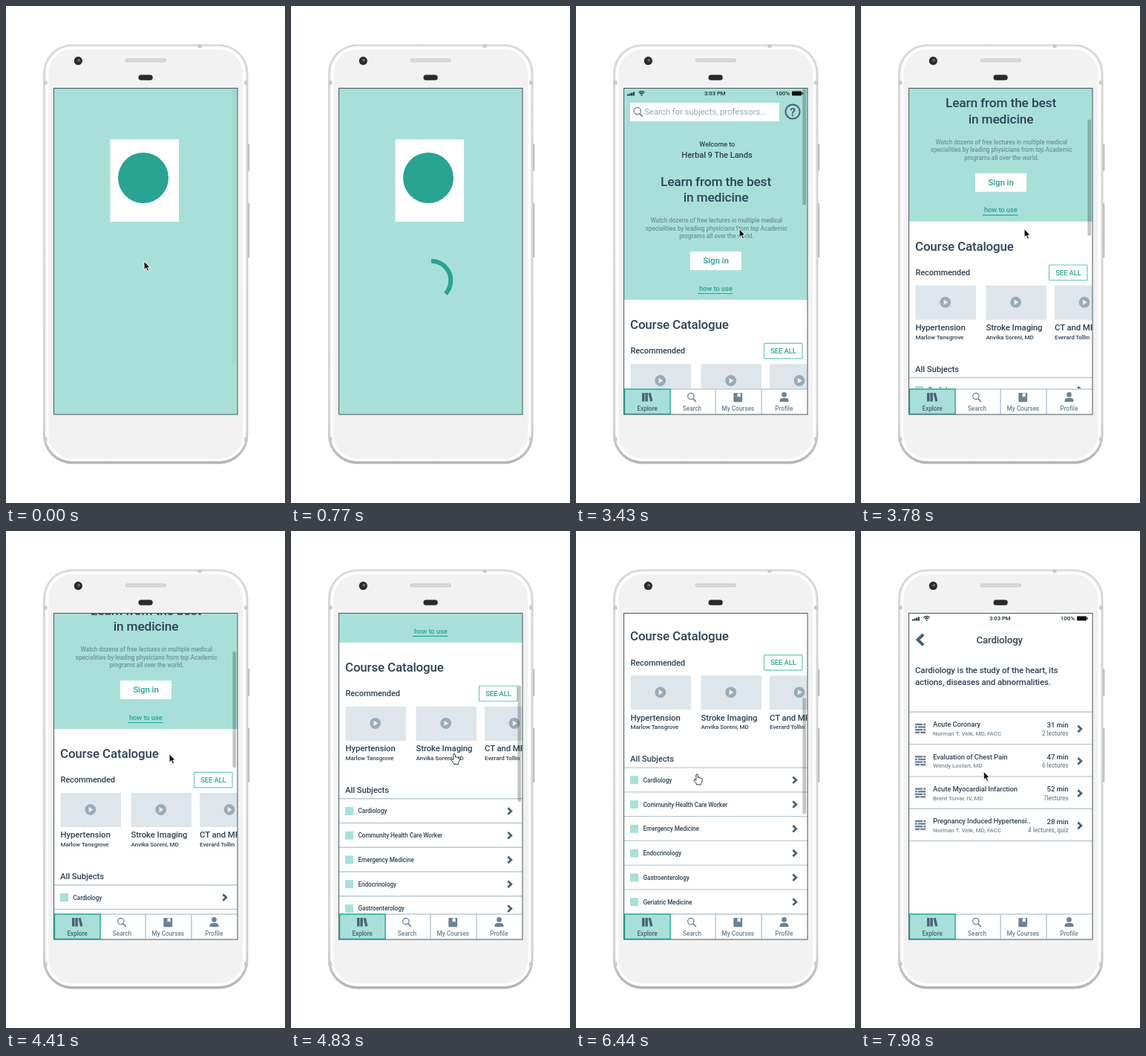
An HTML page for the animation above (8000 ms loop, 376 by 668 pixels).

```html
<!DOCTYPE html>
<html lang="en">
<head>
<meta charset="utf-8">
<title>Course app walkthrough</title>
<style>
html, body { margin: 0; width: 100%; height: 100%; overflow: hidden; background: #fff; }
svg { display: block; }
text { font-family: Roboto, "Open Sans", sans-serif; white-space: pre; letter-spacing: -.008em; }
</style>
</head>
<body>
<svg id="stage" width="376" height="668" viewBox="0 0 376 668"></svg>
<script>
const LOOP = 8000, STEP = 70;
const MINT = '#a8e0d9', TEAL = '#29a392', INK = '#2f4254', SLATE = '#4a6172', GREY = '#7a8c9a', LINE = '#bccad3';

const rect = (x, y, w, h, fill, extra = '') =>
  `<rect x="${x}" y="${y}" width="${w}" height="${h}" fill="${fill}" ${extra}/>`;
const circle = (x, y, r, fill, extra = '') =>
  `<circle cx="${x}" cy="${y}" r="${r}" fill="${fill}" ${extra}/>`;
const stroke = (d, color, width, extra = '') =>
  `<path d="${d}" fill="none" stroke="${color}" stroke-width="${width}" ${extra}/>`;
const shape = (d, fill, extra = '') => `<path d="${d}" fill="${fill}" ${extra}/>`;
const text = (x, y, size, str, fill = INK, anchor = 'start', weight = 500) =>
  `<text x="${x}" y="${y}" font-size="${size}" fill="${fill}" text-anchor="${anchor}" font-weight="${weight}">${str}</text>`;
const group = (id, body) => `<g id="${id}">${body}</g>`;
const chevron = y => stroke(`M292.3 ${y - 4.3}l4.5 4.3l-4.5 4.3`, SLATE, 2.8);
const divider = y => stroke(`M65 ${y}H312`, LINE, 1.4);

function phone() {
  const bands = [[50.5, 103], [321, 103], [50.5, 582], [321, 582]]
    .map(([x, y]) => rect(x, y - 2.5, 5, 5, '#cacaca')).join('');
  return `<defs>
    <linearGradient id="rim" x2="0" y2="1"><stop stop-color="#d6d6d6"/><stop offset=".9" stop-color="#d3d3d3"/><stop offset="1" stop-color="#b4b4b4"/></linearGradient>
    <clipPath id="screen">${rect(65, 111, 247, 438, '#000')}</clipPath></defs>`
    + rect(325, 185, 3.2, 37, '#b9b9b9', 'rx="1"') + rect(325, 265, 3.2, 73, '#b9b9b9', 'rx="1"')
    + rect(50, 51.5, 276.5, 564, 'url(#rim)', 'rx="39"')
    + rect(52.5, 53.5, 271.5, 558.5, '#ececec', 'rx="37"')
    + rect(55.5, 56.5, 265.5, 553.5, '#f2f2f2', 'rx="34" stroke="#fff" stroke-width="3.5"')
    + bands + rect(258.5, 52, 5, 4, '#c6c6c6')
    + rect(161, 71, 54.5, 4, '#dadada', 'rx="2" stroke="#c3c3c3" stroke-width=".8"')
    + circle(97.3, 73.7, 5.6, '#2b2b2b') + circle(97.8, 73.2, 2, '#555') + circle(98.6, 72.4, .8, '#aaa')
    + rect(178.5, 92.4, 19.2, 7.4, '#2a2a2a', 'rx="3.6"');
}

function statusBar() {
  const bars = [0, 1, 2, 3].map(i => rect(69 + i * 2.6, 118.6 - i, 2, 2 + i, '#1d2b2e')).join('');
  const wifi = stroke('M84.3 116.4a5.8 5.8 0 0 1 8.2 0M86 118.2a3.4 3.4 0 0 1 4.8 0', '#1d2b2e', 1.3) + circle(88.4, 119.8, 1, '#1d2b2e');
  return bars + wifi + text(187.3, 120.4, 7.8, '3:03 PM', '#1d2b2e', 'middle')
    + text(288, 120.4, 8, '100%', '#1d2b2e', 'end')
    + rect(291, 114.5, 13, 6, '#111', 'rx="1"') + rect(304.6, 116, 1.2, 3, '#111');
}

function splash() {
  return rect(65, 110, 247, 439, MINT) + rect(140.5, 179.3, 92.5, 110.7, '#fff') + circle(185, 231, 34, TEAL)
    + stroke('M189 342.7a26.3 26.3 0 0 1 0 52.6a26.3 26.3 0 0 1 0-52.6', TEAL, 6, 'id="ring" pathLength="100"');
}

function card(x, center, title, teacher) {
  return rect(x, 481, 81.5, 46, '#dee6ec') + circle(center, 503.5, 7.4, '#9aabb7')
    + shape(`M${center - 2.2} 499.8v7.4l5.8-3.7z`, '#e8eef2')
    + text(x, 541.3, 11.4, title) + text(x, 553.2, 8.05, teacher);
}

function home() {
  const intro = ['Watch dozens of free lectures in multiple medical', 'specialities by leading physicians from top Academic', 'programs all over the world.'];
  const subjects = ['Cardiology', 'Community Health Care Worker', 'Emergency Medicine', 'Endocrinology', 'Gastroenterology', 'Geriatric Medicine', 'Hematology'];
  const rows = subjects.map((name, i) => {
    const top = 604.8 + i * 32.75, mid = top + 16.7;
    return divider(top) + rect(73, mid - 5.5, 11, 11, MINT) + text(90.5, mid + 3, 8.2, name) + chevron(mid);
  }).join('');
  return rect(65, 100, 247, 760, '#fff') + rect(65, 100, 247, 295, MINT) + statusBar()
    + rect(73, 130, 201, 25, '#fff')
    + circle(82.7, 141, 4.6, 'none', 'stroke="#60798a" stroke-width="1.2"') + stroke('M86 144.5l4 4.2', '#60798a', 1.6)
    + text(92, 146.2, 11.5, 'Search for subjects, professors...', '#98a7b2', 'start', 400)
    + circle(292, 142, 9.6, 'none', `stroke="${SLATE}" stroke-width="2"`) + text(292, 147.5, 15.5, '?', SLATE, 'middle', 700)
    + text(190.3, 189, 9.2, 'Welcome to', INK, 'middle')
    + text(190, 204, 11.2, 'Herbal 9 The Lands', INK, 'middle')
    + text(188.5, 241.7, 17.3, 'Learn from the best', INK, 'middle')
    + text(188.5, 263.2, 17.3, 'in medicine', INK, 'middle')
    + intro.map((s, i) => text(189.3, 291.2 + i * 10.4, 8.2, s, '#6f9396', 'middle')).join('')
    + rect(154, 330, 69, 25, '#fff') + text(188.5, 346.4, 11.6, 'Sign in', TEAL, 'middle')
    + text(188.3, 382.6, 9.4, 'how to use', TEAL, 'middle') + stroke('M164 386.5H211.5', TEAL, 1.2)
    + text(73, 434.2, 16.9, 'Course Catalogue') + text(73.5, 467.4, 11, 'Recommended')
    + rect(253.5, 453.3, 51.5, 20.5, '#fff', 'rx="1" stroke="#6cc5b9" stroke-width="1.2"')
    + text(279.5, 467, 9.4, 'SEE ALL', TEAL, 'middle')
    + card(73.5, 113.7, 'Hypertension', 'Marlow Tansgrove')
    + card(168.5, 208.7, 'Stroke Imaging', 'Anvika Soreni, MD')
    + card(261, 301, 'CT and MRI Basics', 'Everard Tollin')
    + text(73, 597.2, 11.3, 'All Subjects') + rows;
}

function lectureIcon(y) {
  return [10, 3, 10, 6].map((split, i) => {
    const top = y - 6.5 + i * 3.6;
    return rect(73, top, split, 2.4, '#6d8193') + rect(74 + split, top, 13 - split, 2.4, '#6d8193');
  }).join('');
}

function detail() {
  const lectures = [
    ['Acute Coronary', 'Norman T. Velk, MD, FACC', '31 min', '2 lectures'],
    ['Evaluation of Chest Pain', 'Wendy Lostari, MD', '47 min', '6 lectures'],
    ['Acute Myocardial Infarction', 'Brent Tolvar, IV, MD', '52 min', '7lectures'],
    ['Pregnancy Induced Hypertensi..', 'Norman T. Velk, MD, FACC', '28 min', '4 lectures, quiz']
  ];
  const rows = lectures.map(([title, teacher, length, count], i) => {
    const y = 243.3 + i * 43.3;
    return divider(y) + lectureIcon(y + 22) + chevron(y + 22.7)
      + text(97, y + 20, 9.4, title) + text(97, y + 31.7, 8.1, teacher, GREY)
      + text(279.5, y + 20.4, 9.6, length, INK, 'end') + text(279.5, y + 31.7, 8.2, count, GREY, 'end');
  }).join('');
  return rect(65, 110, 247, 439, '#fff') + statusBar() + stroke('M84 139l-7.5 7.2l7.5 7.2', SLATE, 4)
    + text(186.7, 151, 13.2, 'Cardiology', INK, 'middle')
    + text(73, 190.8, 11.4, 'Cardiology is the study of the heart, its')
    + text(73, 207, 11.4, 'actions, diseases and abnormalities.')
    + rows + divider(416.5);
}

function navBar() {
  const tint = '#6c8295';
  const label = (x, name, fill) => text(x, 544.3, 8.3, name, fill, 'middle');
  return rect(65, 514.5, 247, 35, '#fff') + stroke('M65 515H312M188 515V549M250 515V549', '#bdcbd8', 1.6)
    + rect(65.5, 515, 61.5, 33.5, MINT, 'stroke="#2eb3a3" stroke-width="1.6"')
    + rect(89, 520, 3.4, 11.5, SLATE) + rect(93.4, 520, 3.4, 11.5, SLATE)
    + shape('M97.5 520.6l3.2-.8l2.7 11l-3.2.9z', SLATE)
    + circle(154.8, 524.6, 4.2, 'none', `stroke="${tint}" stroke-width="1.3"`) + stroke('M157.8 527.8l4 4', tint, 1.7)
    + rect(212.3, 520, 11.8, 12.2, tint, 'rx="1"') + shape('M217.6 520.5h4v5.6l-2-1.6l-2 1.6z', '#fff')
    + circle(280.5, 522.4, 3.3, tint) + shape('M274.6 532v-2.2q0-3 5.9-3t5.9 3v2.2z', tint)
    + label(96, 'Explore', SLATE) + label(156.5, 'Search', tint) + label(218.3, 'My Courses', tint) + label(280.3, 'Profile', tint);
}

function pointers() {
  const outline = 'stroke-linejoin="round" stroke="#fff" stroke-width="1"';
  return group('arrow', shape('M0 0V11.6L2.7 9.2L4.6 13.6L6.6 12.7L4.8 8.5H8.2Z', '#111', outline))
    + group('hand', shape('M-1.2 1.2q0-1.3 1.2-1.3t1.3 1.3v3.2q1.4-.7 2 .4q1.4-.5 1.9.6q1.9-.3 2 1.4q.2 3.4-1.7 5.8v1.4h-6v-1.2q-1.6-1.6-3.4-4.6q-.5-1.6 1-1.5l1.7 1.6z', '#fff', 'stroke="#222" stroke-width=".9" stroke-linejoin="round"'));
}

document.getElementById('stage').innerHTML = phone()
  + `<g clip-path="url(#screen)">` + group('splash', splash()) + group('home', home()) + group('detail', detail())
  + group('nav', navBar()) + rect(305.4, 111, 4.6, 156.5, '#000', 'id="bar" rx="2.3"') + '</g>'
  + rect(64.5, 110.5, 247.5, 438.5, 'none', 'stroke="#47595b" stroke-width="1"') + pointers();

const part = Object.fromEntries(['ring', 'splash', 'home', 'detail', 'nav', 'bar', 'arrow', 'hand']
  .map(id => [id, document.getElementById(id)]));
const clamp = v => Math.max(0, Math.min(1, v));
const span = (t, from, to) => clamp((t - from) / (to - from));
const easeOut = (u, power) => 1 - (1 - u) ** power;
const show = (el, on) => el.setAttribute('visibility', on ? 'visible' : 'hidden');

// Pointer stops: time, x, y
const trail = [
  [0, 186, 343], [210, 179.5, 193], [280, 179.5, 193], [490, 346, 240], [560, 400, 250],
  [2940, 400, 230], [3010, 362, 230], [3220, 181, 331], [3430, 220, 299.5],
  [5670, 220, 299.5], [6440, 163, 327], [7840, 163, 327], [7980, 165.2, 323], [LOOP, 165.2, 323]
];

function pointerAt(t) {
  const next = trail.findIndex(stop => stop[0] > t);
  const [t0, x0, y0] = trail[next - 1], [t1, x1, y1] = trail[next];
  const u = span(t, t0, t1);
  return [x0 + (x1 - x0) * u, y0 + (y1 - y0) * u];
}

function render(time) {
  const t = Math.floor(time / STEP) * STEP;
  const onSplash = t < 2240, onDetail = t >= 7280, onHome = !onSplash && !onDetail;
  const scroll = 129 * easeOut(span(t, 3500, 3990), 2) + 157.7 * easeOut(span(t, 4480, 5320), 2.47);

  show(part.splash, onSplash);
  show(part.home, onHome);
  show(part.detail, onDetail);
  show(part.nav, !onSplash);
  part.home.setAttribute('transform', `translate(0 ${-scroll})`);

  const sweep = 100 * easeOut(span(t, 420, 1750), 1.5);
  part.ring.setAttribute('stroke-dasharray', sweep >= 100 ? 'none' : `${sweep} 200`);
  part.ring.setAttribute('opacity', sweep ? 1 - span(t, 1820, 2100) : 0);

  part.bar.setAttribute('y', onSplash ? 111 : 111 + scroll * .394);
  part.bar.setAttribute('height', onSplash ? 371 : 156.5);
  part.bar.setAttribute('opacity', onSplash ? .04 * (1 - span(t, 280, 490)) : onHome ? .23 * span(t, 3080, 3290) : 0);

  const [x, y] = pointerAt(t), pageY = y + scroll;
  const overLink = (pageY > 330 && pageY < 355 && x > 154 && x < 223)
    || (pageY > 481 && pageY < 558 && x > 168 && x < 250) || pageY > 605;
  const pointing = onHome ? overLink : onDetail && t < 7910;
  for (const el of [part.arrow, part.hand]) el.setAttribute('transform', `translate(${x} ${y})`);
  show(part.arrow, !pointing);
  show(part.hand, pointing);
}

const start = performance.now();
function tick() {
  render((performance.now() - start) % LOOP);
  requestAnimationFrame(tick);
}
render(0);
requestAnimationFrame(tick);
</script>
</body>
</html>
```
